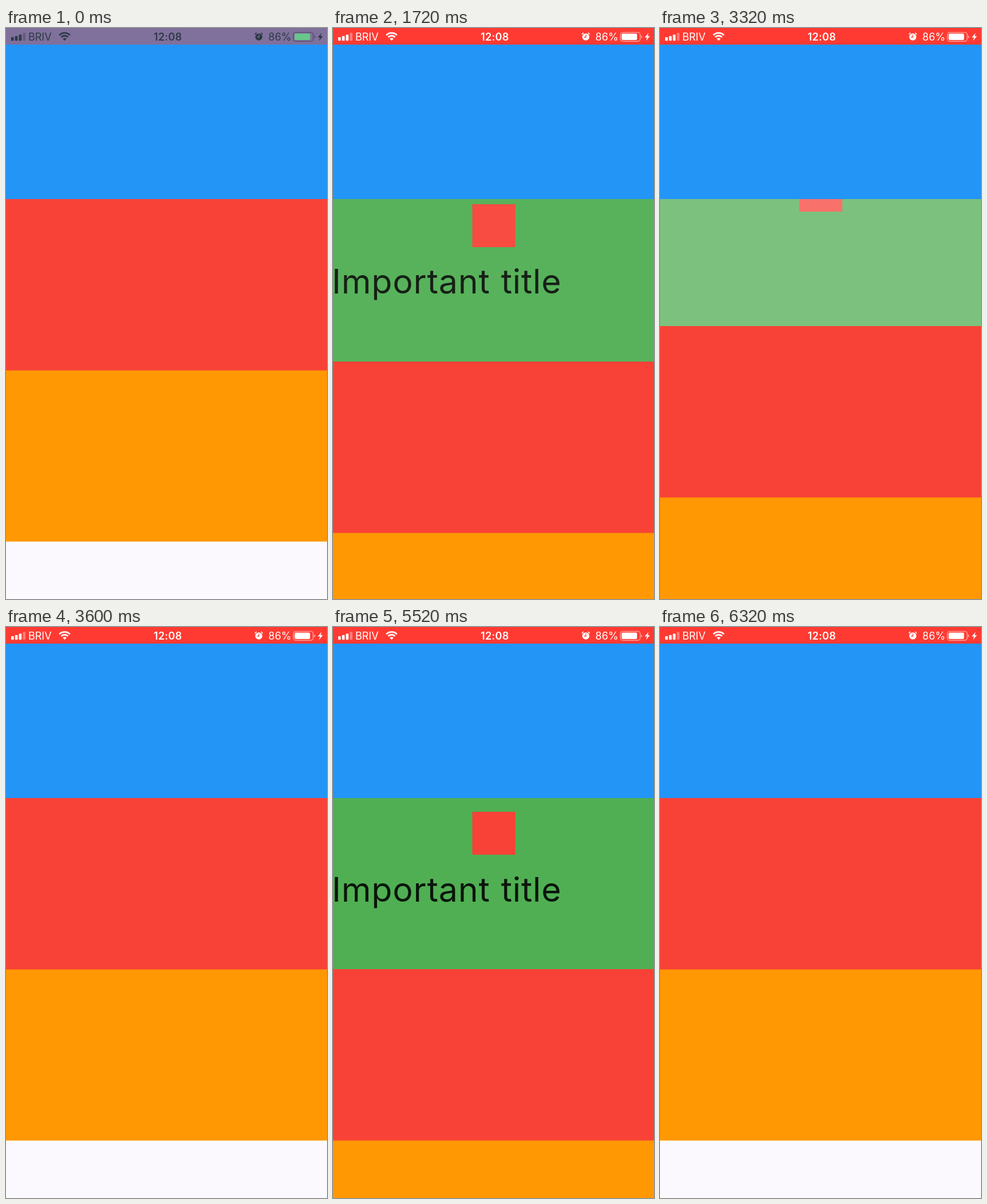
Animation, 561 px wide and 998 px high, one loop 6.4 s. Source, as an HTML page:

```html
<!DOCTYPE html>
<html lang="en">
<head>
<meta charset="utf-8">
<title>Expanding panel</title>
<style>
  html, body { margin: 0; width: 100%; height: 100%; overflow: hidden; background: #fbf9fd; }
  svg { display: block; width: 100%; height: 100%; --bar: #ff3a32; --ink: #fff; --charge: #fff; }
  text { font-family: Inter, Roboto, sans-serif; white-space: pre; }
  #title { font-size: 59px; letter-spacing: .85px; word-spacing: 1.5px; }
  .status { fill: var(--ink); font-size: 18px; }
  .line { fill: none; stroke: var(--ink); }
</style>
</head>
<body>
<svg id="stage" viewBox="0 0 561 998" preserveAspectRatio="none">
  <defs>
    <clipPath id="window"><rect id="clip" x="0" y="299" width="561" height="0"/></clipPath>
  </defs>
  <rect width="561" height="998" fill="#fbf9fd"/>

  <g id="panel" clip-path="url(#window)">
    <g id="content">
      <rect y="299" width="561" height="299" fill="#50af53"/>
      <rect x="243.5" y="323" width="75" height="75" fill="#f84237"/>
      <text id="title" x="-2" y="479.6" fill-opacity=".88">Important title</text>
    </g>
  </g>

  <g id="below">
    <rect y="598" width="561" height="299.6" fill="#ff9803"/>
    <rect y="299" width="561" height="299.5" fill="#f84237"/>
  </g>

  <rect y="29" width="561" height="270" fill="#2395f6"/>
  <rect width="561" height="29" fill="var(--bar)"/>

  <g class="status">
    <!-- signal -->
    <rect x="9" y="16" width="4.6" height="6.2" rx="1"/>
    <rect x="15.8" y="14" width="4.6" height="8.2" rx="1"/>
    <rect x="22.6" y="11.4" width="4.6" height="10.8" rx="1"/>
    <rect x="29.4" y="8.4" width="4.6" height="13.8" rx="1" opacity=".35"/>
    <text x="39" y="22">BRIV</text>
    <!-- wifi -->
    <path d="M102.5 22.2l-3.4-3.4a4.8 4.8 0 0 1 6.8 0z"/>
    <path class="line" stroke-width="2.8" d="M96.5 16a8.5 8.5 0 0 1 12 0M93.2 12.4a13.2 13.2 0 0 1 18.6 0"/>
    <text x="282.8" y="22" text-anchor="middle" font-weight="600" letter-spacing=".3">12:08</text>
    <!-- alarm -->
    <circle cx="441.8" cy="15.6" r="6.2"/>
    <path class="line" stroke-width="1.5" stroke-linecap="round" d="M435.2 10.8l2.2-2.2M448.4 10.8l-2.2-2.2"/>
    <path fill="none" stroke="var(--bar)" stroke-width="1.3" d="M442 11.6v4.4h-3.2"/>
    <text x="458.6" y="22">86%</text>
    <!-- battery -->
    <rect class="line" x="502.3" y="7.6" width="34.4" height="15.6" rx="4" stroke-width="1.4" opacity=".55"/>
    <path d="M538.4 12.8q2 .6 2 2.6t-2 2.6z" opacity=".55"/>
    <rect x="504.4" y="9.7" width="27" height="11.4" rx="2" fill="var(--charge)"/>
    <path d="M551.6 8.4l-6.8 8h4l-1.8 6 6.8-8.2h-4z"/>
  </g>
</svg>
<script>
  const LOOP = 6400, STEP = 40, DURATION = 600, FULL = 299, FADE = 280;
  const TITLE_RISE = 11;
  const TOGGLES = [
    { at: 1288, open: true },
    { at: 2987, open: false },
    { at: 4313, open: true },
    { at: 5707, open: false }
  ];
  const BAR = [[128, 112, 156], [255, 58, 50]];
  const INK = [[43, 58, 69], [255, 255, 255]];
  const CHARGE = [[103, 199, 140], [255, 255, 255]];

  const $ = id => document.getElementById(id);
  const clamp = x => Math.min(1, Math.max(0, x));
  const mix = ([a, b], p) => `rgb(${a.map((v, i) => Math.round(v + (b[i] - v) * p))})`;
  const shift = (id, y) => $(id).setAttribute('transform', `translate(0 ${y})`);

  // cubic-bezier(.25, .1, .25, 1)
  const bezier = (a, b, s) => 3 * a * s * (1 - s) ** 2 + 3 * b * s * s * (1 - s) + s ** 3;
  function ease(x) {
    if (x <= 0 || x >= 1) return clamp(x);
    let lo = 0, hi = 1;
    for (let i = 0; i < 30; i++) {
      const mid = (lo + hi) / 2;
      if (bezier(.25, .25, mid) < x) lo = mid; else hi = mid;
    }
    return bezier(.1, 1, lo);
  }

  function panelState(t) {
    const last = TOGGLES.filter(g => g.at <= t).pop();
    if (!last) return { size: 0, titled: false };
    const p = clamp((t - last.at) / DURATION);
    if (last.open) return { size: ease(p), titled: true };
    const size = ease(1 - p);
    // the title goes as soon as the panel visibly starts closing
    return size > .99 ? { size: 1, titled: true } : { size, titled: false };
  }

  function draw(t) {
    const { size, titled } = panelState(t);
    const height = Math.round(FULL * size);
    $('clip').setAttribute('height', height);
    $('panel').setAttribute('opacity', size);
    shift('content', height - FULL);
    shift('title', TITLE_RISE * (size - 1));
    shift('below', height);
    $('title').setAttribute('visibility', titled ? 'visible' : 'hidden');

    const fade = clamp(t / FADE), style = $('stage').style;
    style.setProperty('--bar', mix(BAR, fade));
    style.setProperty('--ink', mix(INK, fade));
    style.setProperty('--charge', mix(CHARGE, fade));
  }

  const start = performance.now();
  function tick() {
    const t = (performance.now() - start) % LOOP;
    draw(Math.floor(t / STEP) * STEP);
    requestAnimationFrame(tick);
  }
  draw(0);
  requestAnimationFrame(tick);
</script>
</body>
</html>
```
